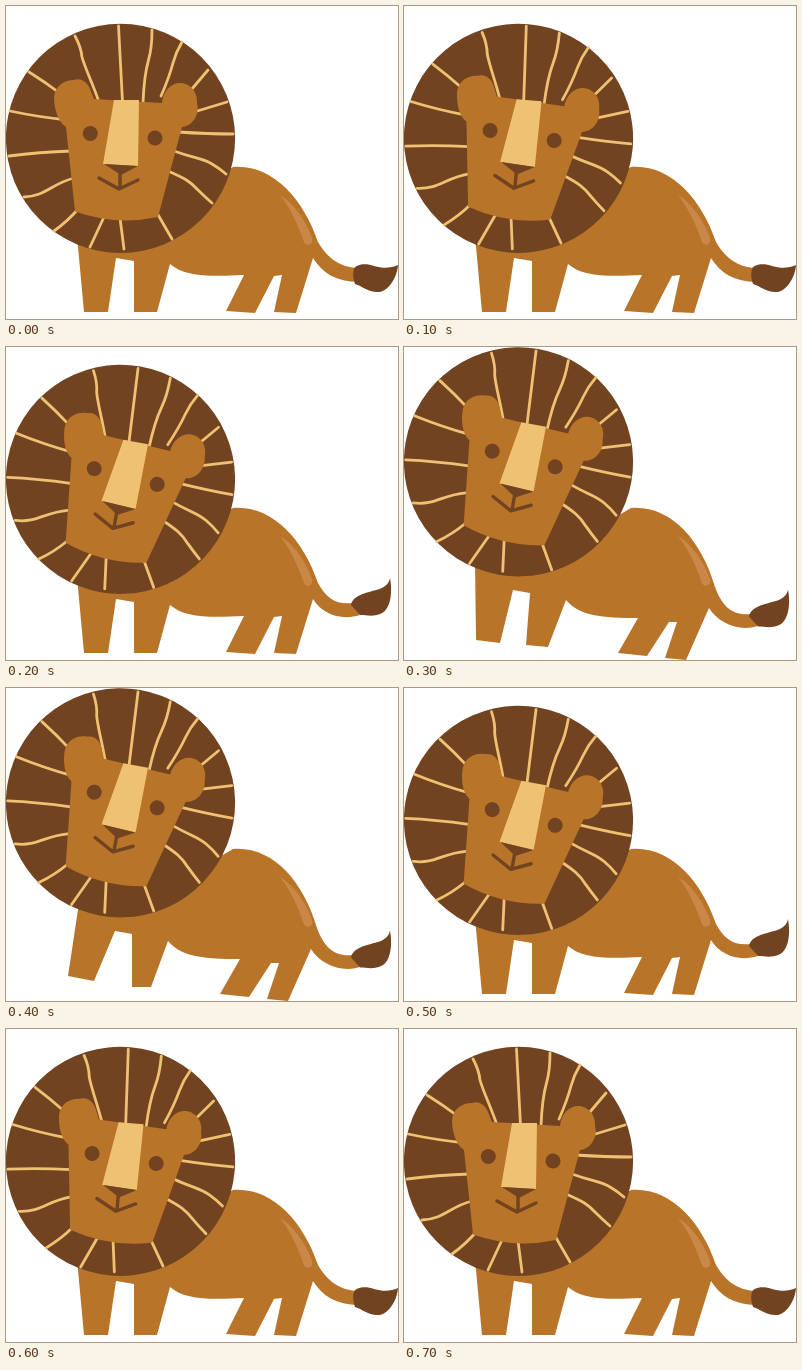
An HTML page that plays this animation: 392x313 px, repeating every 900 ms.

```html
<!DOCTYPE html>
<html lang="en">
<head>
<meta charset="utf-8">
<title>Lion</title>
<style>
  html, body { margin: 0; width: 100%; height: 100%; overflow: hidden; background: #fff; }
  svg { display: block; width: 100%; height: 100%; }
  .fur { fill: #b87429; }
  .dark { fill: #714320; }
  .light { fill: #efc172; }
  .mane { fill: none; stroke: #efc172; stroke-width: 2.8; stroke-linecap: round; }
  .mouth { fill: none; stroke: #714320; stroke-width: 3.4; stroke-linecap: round; stroke-linejoin: round; }
</style>
</head>
<body>
<svg viewBox="0 0 392 313">
  <path id="body" class="fur"/>
  <path id="tuft" class="dark"/>
  <path fill="#c98848" d="M274 189C288 197 300 215 306 232C308 239 300 241 298 236C292 219 285 203 274 189Z"/>
  <g id="head">
    <circle class="dark" cx="114.5" cy="132.3" r="114.6"/>
    <path class="mane" d="M112.5 20Q114 50 116.5 96
      M146 24Q146 42 142.5 54Q138 70 137 97
      M176 36Q170 46 167 57Q163 72 155 90
      M202 64L180 90
      M221 96L188 106
      M227 128Q202 128 172 126
      M168 145C190 153 196 152 206 158Q213 162 220 168
      M162 165C178 172 184 175 192 184Q198 190 206 197
      M151 207L166 233
      M114 212L118 243
      M98 211L84 241
      M73 202Q62 215 48 225
      M68 172C45 178 40 190 18 191
      M66 145Q33 146 3 150
      M62 114Q32 111 4 105
      M55 88Q39 76 23 66
      M69 30Q75 41 76 51C79 62 86 76 93 96"/>
    <g id="face">
      <path class="fur" d="M60 121C51 115 48 101 48 91C49 80 58 74 68 74C75 71 82 77 84 83L88 93L156 97
        C157 85 165 77 174 77C184 77 192 86 191 97C194 108 187 120 176 121L152 211Q110 220 69 205.5Z"/>
      <path class="light" d="M108 94H133L132 160L97 158Z"/>
      <path class="dark" d="M98 158L132 160L115 169Z"/>
      <path class="mouth" d="M114 166V181M93 172L113 183L132 174"/>
      <circle class="dark" cx="84.3" cy="127.5" r="7.5"/>
      <circle class="dark" cx="149" cy="132" r="7.5"/>
    </g>
  </g>
</svg>
<script>
const $ = id => document.getElementById(id);
const LOOP = 900;

const frontLegs = {
  stand: 'M71 230L78 306H102L110 252L128 255V306H151L164 258',
  stepA: 'M71 215L72 293L96 296L109 243L126 246L122 298L144 300L162 253',
  stepB: 'M73 215L62 288L88 293L109 243L126 246V299H145L162 253'
};
const hindLegs = {
  low: 'C178 270 200 271 238 269L220 305L249 307L268 270L276 269L268 306L290 307L307 252',
  high: 'C175 269 198 271 234 271L214 306L243 309L265 275L273 275L261 311L282 313L305 261'
};
// lower edge out to the tuft, upper edge back to the rump
const tails = {
  out: 'C316 267 331 276 352 276V262C332 261 321 251 312 236',
  up: 'C316 267 335 274 354 268L347 256C328 258 320 250 312 236',
  high: 'C314 276 335 285 354 279L347 267C328 269 318 259 311 240'
};
const rump = 'C297 192 266 158 227 161L215 168L180 205Z';
const tufts = {
  out: 'M348 263C350 258 360 257 368 260C378 263 385 262 392 259C391 273 381 287 371 286C362 286 356 280 349 278Q346 270 348 263Z',
  up: 'M345 258C347 248 360 246 370 243C378 241 383 237 384 231C387 247 384 264 374 267C367 270 360 268 354 268Z'
};

// [start ms, front legs, tail, head tilt 0..1, raised]
const steps = [
  [0, 'stand', 'out', 0, false],
  [100, 'stand', 'out', 0.5, false],
  [200, 'stand', 'up', 1, false],
  [300, 'stepA', 'high', 1, true],
  [400, 'stepB', 'high', 1, true],
  [500, 'stand', 'up', 1, false],
  [600, 'stand', 'out', 0.5, false],
  [700, 'stand', 'out', 0, false]
];

function pose([, legs, tail, tilt, raised]) {
  const hind = hindLegs[raised ? 'high' : 'low'];
  $('body').setAttribute('d', frontLegs[legs] + hind + tails[tail] + rump);
  $('tuft').setAttribute('d', tufts[tail === 'out' ? 'out' : 'up']);
  $('tuft').setAttribute('transform', `translate(0 ${raised ? 11.5 : 0})`);
  $('head').setAttribute('transform',
    `translate(0 ${raised ? -17.5 : 0}) rotate(${10 * tilt} 114.5 132.3)`);
  $('face').setAttribute('transform', `translate(${2.5 * tilt} ${-1.1 * tilt})`);
}

let current;
function draw(now) {
  const t = now % LOOP;
  const step = steps.findLast(s => s[0] <= t);
  if (step !== current) pose(current = step);
  requestAnimationFrame(draw);
}
pose(current = steps[0]);
requestAnimationFrame(draw);
</script>
</body>
</html>
```
